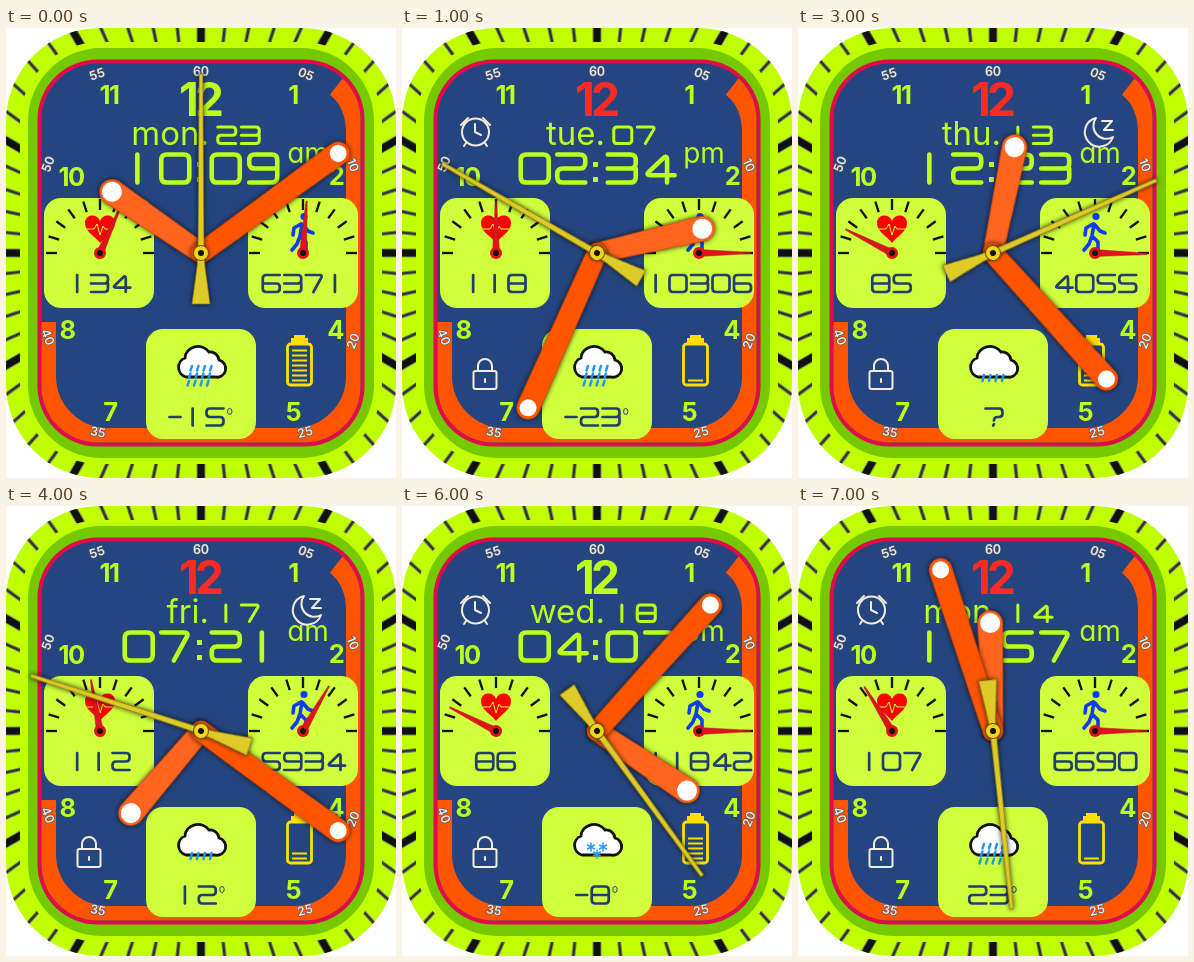
An HTML page that plays this animation: 390 px wide and 450 px high, repeating every 8 s.

```html
<!DOCTYPE html>
<html lang="en">
<head>
<meta charset="utf-8">
<title>Watch face</title>
<style>
  html, body { margin: 0; height: 100%; overflow: hidden; background: #fff; }
  svg { display: block; width: 390px; height: 450px; }
  text { font-family: Inter, sans-serif; text-anchor: middle; }
  .hour { font-weight: 700; font-size: 25.5px; letter-spacing: -1.5px; fill: #bcff1c; }
  .minute { font-weight: 600; font-size: 12.5px; fill: #e4eaf0; stroke: #555; stroke-width: 1.2px; paint-order: stroke; }
  .word { font-feature-settings: "cv11"; fill: #bcff1c; }
  .line { fill: none; stroke-linecap: round; stroke-linejoin: round; }
  .icon { stroke: #f3ecdc; stroke-width: 2; }
  .hand { filter: drop-shadow(0 0 2.5px #000c); }
</style>
</head>
<body>
<svg viewBox="0 0 390 450">
  <clipPath id="case"><rect width="390" height="450" rx="94"/></clipPath>
  <clipPath id="face"><rect x="35.500" y="35.500" width="319" height="379" rx="56"/></clipPath>
  <g clip-path="url(#case)">
    <rect width="390" height="450" fill="#bfff00"/>
    <g id="bezel"></g>
    <rect x="14" y="14" width="362" height="422" rx="80" fill="#bfff00"/>
  </g>
  <rect x="22" y="20" width="346" height="410" rx="73" fill="#75c900"/>
  <rect x="31.500" y="31.500" width="327" height="387" rx="60" fill="#df0b4b"/>
  <g clip-path="url(#face)">
    <rect width="390" height="450" fill="#254580"/>
    <path d="M333 55Q355 72 355 105V348A67 67 0 0 1 288 415H102A67 67 0 0 1 35 348V294" fill="none" stroke="#ff5500" stroke-width="30"/>
  </g>
  <g id="labels"></g>
  <g fill="#d0ff3c">
    <rect x="38" y="170" width="110" height="110" rx="17"/>
    <rect x="242" y="170" width="110" height="110" rx="17"/>
    <rect x="140" y="301" width="110" height="110" rx="17"/>
  </g>
  <g id="dials"></g>
  <path d="M94 215C89 208 79 204 79 195C79 186 91 185 94 193C97 185 109 186 109 195C109 204 99 208 94 215Z" fill="#f00"/>
  <path class="line" d="M81 201H88L91 196L94 207L97 198L99 201H107" stroke="#d0ff3c"/>
  <g stroke="#0f3cf0" stroke-width="3.600" class="line">
    <path d="M296 196L294 208L300 214V222M294 208L291 216L286 222M295 196L288 200L287 207M297 197L302 203L307 205"/>
    <circle cx="298" cy="188.500" r="1.800"/>
  </g>
  <g id="live"></g>
</svg>
<script>
const $ = id => document.getElementById(id);
const LIME = '#bcff1c', NAVY = '#223d70', YELLOW = '#ffdf00';
const range = (n, f) => Array.from({ length: n }, (_, i) => f(i)).join('');
const text = (cls, x, y, s, extra = '') => `<text class="${cls}" x="${x}" y="${y}" ${extra}>${s}</text>`;
const turn = (angle, x, y, body) => `<g transform="translate(${x} ${y}) rotate(${angle})">${body}</g>`;

// Display digits: strokes between named points of a unit box.
const POINTS = {
  a: [0, 0], m: [.45, 0], b: [1, 0], c: [0, .5], x: [.5, .5], d: [1, .5], e: [0, 1], n: [.45, 1], f: [1, 1],
  g: [.78, 0], h: [.78, 1], i: [0, .74], j: [1.05, .74], o: [.5, .68], p: [.5, .92]
};
const GLYPHS = {
  0: 'mbfeam', 1: 'mn', 2: 'abdcef', 3: 'abdc dfe', 4: 'hgij', 5: 'bacdfe',
  6: 'baefdc', 7: 'abn', 8: 'mbfeam cd', 9: 'efbacd', '?': 'abdxo pn', '-': 'cd'
};

function strokePath(names, x, y, w, h) {
  const pts = [...names].map(k => [x + POINTS[k][0] * w, y + POINTS[k][1] * h]);
  const toward = (p, q) => {
    const t = h * .2 / Math.hypot(q[0] - p[0], q[1] - p[1]);
    return [p[0] + (q[0] - p[0]) * t, p[1] + (q[1] - p[1]) * t];
  };
  return pts.map((p, i) => !i ? `M${p}` : i === pts.length - 1 ? `L${p}`
    : `L${toward(p, pts[i - 1])}Q${p} ${toward(p, pts[i + 1])}`).join('');
}

const glyph = (ch, x, y, w, h) => GLYPHS[ch].split(' ').map(s => strokePath(s, x, y, w, h)).join('');

function digits(s, cx, y, w, h, pitch, color, weight) {
  const advance = ch => ch === '-' ? pitch * .72 : pitch;
  const body = s.replace('°', '');
  let x = cx - [...body].reduce((sum, ch) => sum + advance(ch), 0) / 2, d = '';
  for (const ch of body) {
    const a = advance(ch), gw = ch === '-' ? w * .65 : w;
    d += glyph(ch, x + (a - gw) / 2, y, gw, h);
    x += a;
  }
  const degree = s === body ? '' : `<ellipse cx="${x + 4}" cy="${y + 3}" rx="2.200" ry="3" fill="none" stroke="${color}"/>`;
  return `<path class="line" role="img" aria-label="${s}" d="${d}" stroke="${color}" stroke-width="${weight}"/>` + degree;
}

// Fixed parts of the face
$('bezel').innerHTML = range(60, i => turn(i * 6, 195, 225,
  `<path d="M0 -165V-310" stroke="#7c8c5c" stroke-width="${i % 5 ? 4 : 9}"/>
   <path d="M0 -165V-310" stroke="${i % 5 ? '#333' : '#111'}" stroke-width="${i % 5 ? 2.2 : 7}"/>`));

$('labels').innerHTML =
  [[11, 103, 76], [1, 287, 76], [10, 65, 158], [2, 330, 157], [8, 61, 311], [4, 329, 311], [7, 104, 393], [5, 287, 393]]
    .map(([n, x, y]) => text('hour', x, y, n)).join('') +
  [['60', 195, 43, 0], ['05', 300, 46, 22], ['10', 347, 137, 68], ['20', 347, 313, -68], ['25', 299, 404, -14],
   ['35', 92, 404, 10], ['40', 42, 309, 68], ['50', 42, 136, -68], ['55', 91, 46, -18]]
    .map(([n, x, y, a]) => turn(a, x, y, text('minute', 0, 4.5, n))).join('');

$('dials').innerHTML = [94, 297].map(x => range(11, i =>
  turn(i * 18 - 90, x, 225, `<path d="M0 -43V-54" stroke="#111" stroke-width="2.300"/>`))).join('');

// Changing parts
const ICONS = {
  A: `<g class="line icon"><circle cx="73.500" cy="104" r="13.500"/>
      <path d="M73 96V104L79 107M59 97L66 90M88 97L81 90M64 115L62 118M83 115L85 118"/></g>`,
  M: `<path class="line icon" d="M298 90A14.500 14.500 0 1 0 315 109A13 13 0 0 1 298 90Z"/>
      <path class="line icon" d="M304 93H314L306 102H315"/>`,
  L: `<g class="line icon"><rect x="71.500" y="343" width="23" height="18" rx="2"/>
      <path d="M76 343V338A7 7 0 0 1 90 338V343M83 351V354"/></g>`
};

const battery = level => `<path d="M285 316V310H288V307H299V310H302V316Z" fill="${YELLOW}"/>
  <rect class="line" x="281.500" y="316" width="24" height="41" rx="3" stroke="${YELLOW}" stroke-width="2.800"/>` +
  range(level, i => `<path d="M286 ${352.5 - i * 5}H301" stroke="${YELLOW}" stroke-width="2"/>`);

function weather(kind) {
  const cloud = `<path d="M180 349a10 10 0 0 1 -1 -19a13 12 0 0 1 24 -6a9 9 0 0 1 10 8a8.500 8.500 0 0 1 -4 17Z"
    fill="#fff" stroke="#111" stroke-width="2.800"/>`;
  const rows = kind === 'heavy' ? 3 : 1;
  const rain = range(4 * rows, i => {
    const row = i >> 2, y = (rows > 1 ? 338 : 347) + row * 7.5;
    return `<path class="line" d="M${186 + i % 4 * 6.5 - row * 1.5} ${y}l-1.500 ${rows > 1 ? 4.5 : 6}" stroke="#2196ee" stroke-width="2.400"/>`;
  });
  const snow = [[189, 341], [201, 341], [195, 348]].map(([x, y]) => range(3, i =>
    turn(i * 60, x, y, '<path d="M0 -4.500V4.500" stroke="#2d9bf0" stroke-width="1.600"/>'))).join('');
  return cloud + (kind === 'snow' ? snow : rain);
}

const needle = (x, angle) => turn(angle, x, 225,
  `<path d="M-3.500 0L-.6 -52H.6L3.500 0Z" fill="#e0141e" stroke="#a01820" stroke-width=".5"/>
   <circle r="6" fill="#e3101c"/><circle r="3" fill="#111"/>`);

const hand = (angle, length, tip, dot, color) => turn(angle, 195, 225,
  `<path class="hand" d="M-10 0L${-tip} ${-length}A${tip} ${tip} 0 0 1 ${tip} ${-length}L10 0A10 10 0 0 1 -10 0Z"
    fill="${color}" stroke="#c94300" stroke-width=".6"/><circle cy="${-length}" r="${dot}" fill="#fff"/>`);

const secondHand = s => `<circle cx="195" cy="225" r="10" fill="#d94800"/>` + turn(s * 6, 195, 225,
  `<path class="hand" d="M-1.800 -179H1.800L3 0L4 14L9 51H-9L-4 14L-3 0Z" fill="#dfcb28" stroke="#8a7a14" stroke-width=".7"/>
   <circle r="7.500" fill="#f0d51c" stroke="#5d520c"/><circle r="3" fill="#111"/>`);

// day, date, time, half, second, icons, battery, pulse, dial, steps, dial, temperature, sky
const STATES = [
  ['mon', '23', '1009', 'am', 0, '', 7, '134', 24, '6371', 4, '-15°', 'heavy'],
  ['tue', '07', '0234', 'pm', 50, 'AL', 1, '118', 0, '10306', 90, '-23°', 'heavy'],
  ['wed', '08', '0328', 'pm', 35, 'AL', 1, '140', 29, '7408', 45, '-6°', 'snow'],
  ['thu', '13', '1223', 'am', 11, 'ML', 3, '85', -63, '4055', 91, '?', 'light'],
  ['fri', '17', '0721', 'am', 48, 'ML', 2, '112', -10, '5934', 30, '12°', 'light'],
  ['sat', '24', '0528', 'am', 38, 'AML', 4, '88', -63, '2353', -54, '23°', 'light'],
  ['wed', '18', '0407', 'pm', 24, 'AL', 5, '86', -63, '11842', 90, '-8°', 'snow'],
  ['mon', '14', '1157', 'am', 29, 'AL', 1, '107', -32, '6690', 90, '23°', 'heavy']
];

function render([day, date, time, half, sec, icons, level, pulse, pulseAngle, steps, stepAngle, temp, sky]) {
  const hours = +time.slice(0, 2), minutes = +time.slice(2);
  const panel = (s, x, y) => digits(s, x, y, 17, 17, 21.5, NAVY, 2.7);
  return text('hour', 193.5, 87.5, 12, `style="font-size:46px;letter-spacing:-4px;fill:${level > 3 ? LIME : '#ff2a22'}"`) +
    text('word', 203, 116.5, day + '.', 'style="font-size:33px;text-anchor:end"') +
    digits(date, 232.5, 99, 18, 16.5, 23.5, LIME, 3) +
    digits(time.slice(0, 2), 151, 126.5, 28, 28, 36.5, LIME, 4.6) +
    digits(time.slice(2), 238.5, 126.5, 28, 28, 37.5, LIME, 4.6) +
    `<path d="M191 134h5v5h-5zM191 149h5v5h-5z" fill="${LIME}"/>` +
    text('word', 302, 135, half, 'style="font-size:28px;font-weight:400"') +
    [...icons].map(k => ICONS[k]).join('') +
    battery(level) + needle(94, pulseAngle) + needle(297, stepAngle) +
    panel(pulse, 93.5, 247) + panel(steps, 297.5, 247) +
    weather(sky) + panel(temp, temp.includes('°') ? 190.5 : 196, 380.5) +
    hand(hours * 30 + minutes / 2, 108, 12.5, 10, '#ff651e') +
    hand(minutes * 6, 169.5, 11.5, 8.5, '#ff5500') + secondHand(sec);
}

let shown = -1;
function frame() {
  const index = Math.floor(performance.now() / 1000) % STATES.length;
  if (index !== shown) $('live').innerHTML = render(STATES[shown = index]);
  requestAnimationFrame(frame);
}
frame();
</script>
</body>
</html>
```
